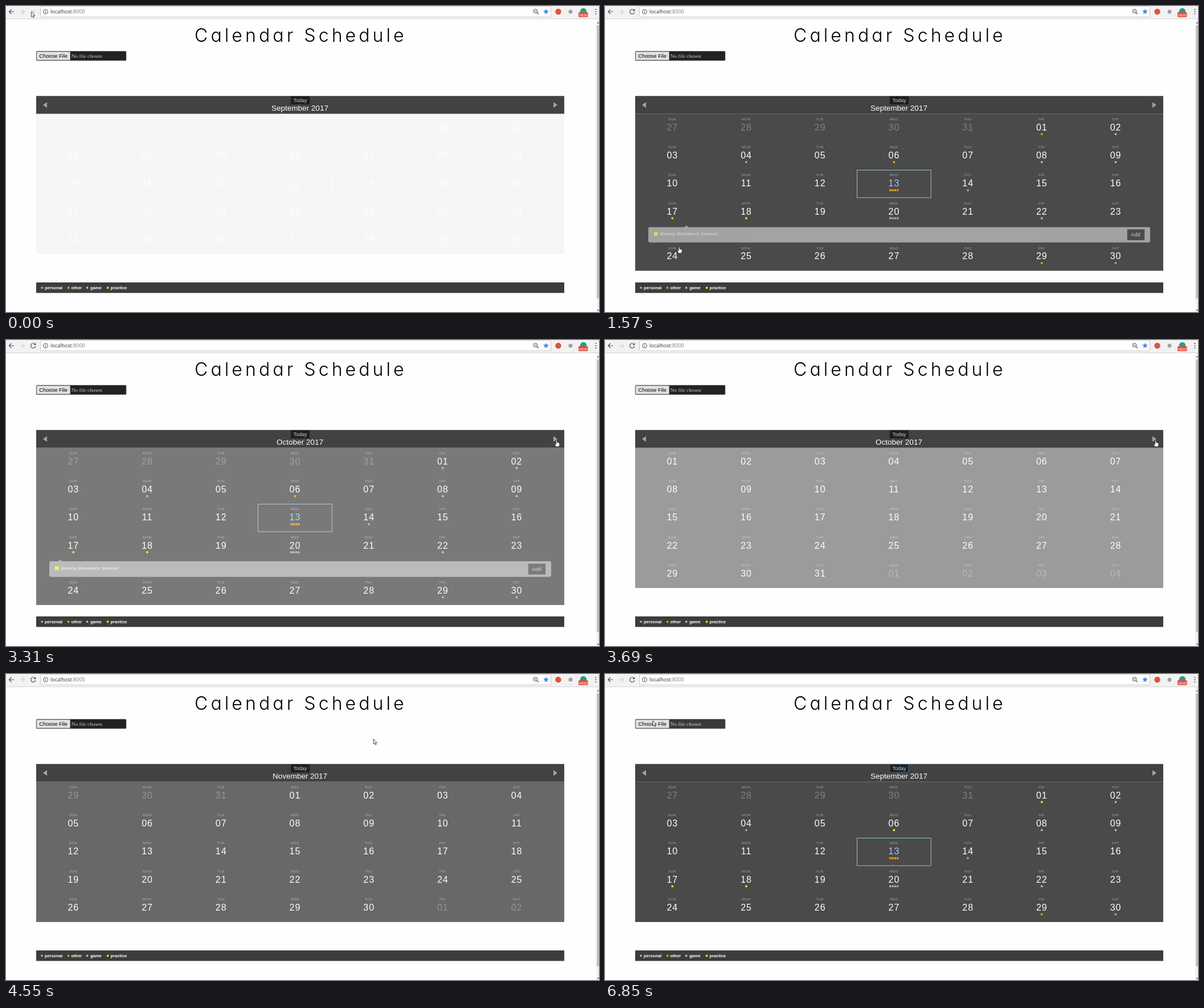
Recreate the animation shown at these times as an HTML page. Size 1041 by 538 pixels, loop 6.93 s.

```html
<!DOCTYPE html>
<html lang="en">
<head>
<meta charset="utf-8">
<title>Calendar Schedule</title>
<style>
  html, body { margin: 0; width: 100%; height: 100%; overflow: hidden; background: #fefefe; }
  svg { display: block; width: 1041px; height: 538px; font-family: "Liberation Sans", Arial, sans-serif; }
  .title { font: 300 32px Inter, sans-serif; letter-spacing: 5.1px; font-feature-settings: "cv11"; }
  .url { font: 9px "Open Sans", sans-serif; }
  .serif { font: 9.25px "Liberation Serif", serif; }
  .name { font-size: 6px; letter-spacing: .5px; fill: #fff; fill-opacity: .5; text-anchor: middle; }
  .num { font-size: 16px; letter-spacing: 1px; fill: #fff; text-anchor: middle; }
  .other { fill-opacity: .3; }
  .today { fill: #9ccaeb; }
  .legend { font-size: 7.5px; font-weight: bold; fill: #fff; }
  .event { font-size: 7.5px; letter-spacing: .5px; fill: #fff; }
</style>
</head>
<body>
<svg id="stage" viewBox="0 0 1041 538"></svg>
<script>
const LOOP = 6930;
const LEFT = 53, TOP = 189.4, WIDTH = 927, COL = 129.7, ROW = 49.33;
const PANEL = { row: 4, margin: 2.4, height: 27.5, start: 1150, length: 500 };
const COLORS = { o: '#ffa500', b: '#9ccaeb', g: '#99c66d', y: '#fff01a' };
const DAYS = ['SUN', 'MON', 'TUE', 'WED', 'THU', 'FRI', 'SAT'];
const EVENTS = { 1: 'y', 2: 'b', 4: 'g', 6: 'y', 8: 'b', 9: 'b', 13: 'oooo', 14: 'g',
  17: 'y', 18: 'y', 20: 'bggg', 22: 'b', 29: 'o', 30: 'g' };

const SEPTEMBER = { lead: 5, length: 30, today: 13 };
const VIEWS = [
  { ...SEPTEMBER, events: { ...EVENTS, 1: 'o', 6: 'o' }, panel: true, fadeIn: [-20, 1000], fadeOut: [3130, 400] },
  { lead: 0, length: 31, events: {}, fadeIn: [3540, 400], fadeOut: [4050, 240] },
  { lead: 3, length: 30, events: {}, fadeIn: [4290, 400], fadeOut: [5550, 190] },
  { ...SEPTEMBER, events: EVENTS, fadeIn: [5740, 400], fadeOut: [9000, 1] },
];
const TITLES = [[0, 'September 2017'], [3130, 'October 2017'], [4050, 'November 2017'], [5400, 'September 2017']];

// time, x, y of the hotspot, hand (1) or arrow (0)
const POINTER = [
  [0, 44.5, 10, 0], [80, 44.5, 10, 0], [760, 97, 80, 0], [880, 104, 215, 1], [1010, 112, 355, 1],
  [1180, 116, 362, 1], [1480, 130, 423, 1], [1990, 130, 423, 1], [2130, 143, 411, 0],
  [2260, 160, 399, 0], [2420, 250, 393, 0], [2700, 700, 250, 1], [2930, 966.5, 176, 1],
  [4200, 966.5, 176, 1], [4370, 830, 140, 0], [4520, 645, 114, 0], [4620, 645, 114, 0],
  [4770, 522, 153, 0], [4880, 516, 164, 1], [5180, 512, 173, 1], [6170, 512, 173, 1],
  [6320, 430, 208, 1], [6480, 310, 180, 0], [6840, 84, 82, 0], [LOOP, 84, 82, 0],
];

const clamp = v => Math.min(1, Math.max(0, v));

function bezier(x1, y1, x2, y2) {
  const at = (a, b, s) => 3 * a * s * (1 - s) ** 2 + 3 * b * s * s * (1 - s) + s ** 3;
  return x => {
    x = clamp(x);
    let low = 0, high = 1;
    for (let i = 0; i < 24; i++) {
      const mid = (low + high) / 2;
      if (at(x1, x2, mid) < x) low = mid; else high = mid;
    }
    return at(y1, y2, high);
  };
}
const ease = bezier(.25, .1, .25, 1);
const easeIn = bezier(.42, 0, 1, 1);
const easeOut = bezier(0, 0, .58, 1);

const rect = (x, y, w, h, fill, more = '') =>
  `<rect x="${x}" y="${y}" width="${w}" height="${h}" fill="${fill}" ${more}/>`;
const text = (x, y, label, more = '') => `<text x="${x}" y="${y}" ${more}>${label}</text>`;
const path = (d, more) => `<path d="${d}" ${more}/>`;
const line = (d, color, width = 1.2) => path(d, `fill="none" stroke="${color}" stroke-width="${width}"`);
const circle = (x, y, r, more) => `<circle cx="${x}" cy="${y}" r="${r}" ${more}/>`;

function browserBar() {
  const star = Array.from({ length: 10 }, (_, i) => {
    const r = i % 2 ? 2.2 : 5.3, a = i * Math.PI / 5;
    return `${948 + r * Math.sin(a)},${10 - r * Math.cos(a)}`;
  }).join(' ');
  return rect(0, 0, 1041, 22, '#f2f2f2') + rect(0, 22, 1041, 1, '#d4d4d4') +
    rect(60.5, .5, 896, 18.5, '#fff', 'stroke="#c9c9c9" rx="1"') +
    line('M14 10H5.5M9.5 6L5.5 10L9.5 14', '#505050') +
    line('M24 10H32.5M28.5 6L32.5 10L28.5 14', '#cfcfcf') +
    `<g id="reload">${line('M51 7.3A4.2 4.2 0 1 0 51.8 11', '#505050')}${path('M52.3 5V9H48.3Z', 'fill="#505050"')}</g>` +
    `<g id="stop">${line('M44 6.5L51 13.5M51 6.5L44 13.5', '#d0d0d0')}</g>` +
    circle(69.5, 10, 4, 'fill="none" stroke="#555"') + line('M69.5 9.3V12.4M69.5 7.4V8.5', '#555', 1) +
    text(78, 13, 'localhost<tspan fill="#7b7b7b">:8000</tspan>', 'class="url" fill="#303030"') +
    circle(929.5, 9, 3.2, 'fill="none" stroke="#5a5a5a" stroke-width="1.1"') +
    line('M932 11.5L935 14.5M928 9H931', '#5a5a5a') +
    `<polygon points="${star}" fill="#3c84ee"/>` +
    circle(969.5, 10, 5.2, 'fill="#e0533d"') + circle(991, 10, 3.5, 'fill="#a0a0a0"') +
    circle(1013.5, 9.5, 5.7, 'fill="#17a586"') +
    rect(1005, 11, 16.5, 8.5, '#e34b3e', 'rx="1"') +
    text(1013.2, 17.7, 'NEW', 'font-size="6.2" fill="#fff" text-anchor="middle"') +
    [6, 10, 14].map(y => circle(1035.5, y, 1.1, 'fill="#555"')).join('') +
    rect(1036.5, 23, 4.5, 515, '#f1f1f1') + rect(1037, 34, 4, 480, '#c1c1c1') +
    path('M1037.5 30.5L1039.5 28L1041 30.5ZM1037.5 534L1041 534L1039.5 536.5Z', 'fill="#555"');
}

function pageFrame() {
  const legend = [[61.5, 68, 'personal', 'g'], [108, 114.5, 'other', 'o'], [141, 148, 'game', 'b'], [177, 183.5, 'practice', 'y']];
  return text(331, 63, 'Calendar Schedule', 'class="title"') +
    rect(53.3, 79.8, 157.5, 16, '#222', 'id="fileBox" rx="1" stroke="#303030" stroke-width=".8"') +
    rect(53.9, 80.5, 58.7, 14.5, '#e2e2e2', 'stroke="#999" stroke-width=".8"') +
    text(58.3, 90.7, 'Choose File', 'font-size="9.3"') +
    text(114.8, 90.5, 'No file chosen', 'class="serif" fill="#ccc"') +
    rect(LEFT, 486, WIDTH, 18.5, '#3c3c3c') +
    legend.map(([x, tx, label, color]) =>
      rect(x, 493.7, 3.2, 3.4, COLORS[color]) + text(tx, 498, label, 'class="legend"')).join('');
}

function calendarHeader() {
  return rect(LEFT, 158.2, WIDTH, 31.3, '#424242') +
    path('M72 169V179L65 174ZM961 169V179L968 174Z', 'fill="#a4a4a4"') +
    rect(499.8, 158.8, 33.2, 14.2, '#1f1f1f', 'id="todayButton" stroke-width="1"') +
    text(516.4, 169, 'Today', 'font-size="9" fill="#ccc" text-anchor="middle"') +
    text(516, 184.2, '', 'id="month" font-size="13.5" fill="#fff" text-anchor="middle"');
}

function dayCell(view, index) {
  const n = index - view.lead;
  const inside = n >= 0 && n < view.length;
  const day = inside ? n + 1 : n < 0 ? 32 + n : n - view.length + 1;
  const isToday = inside && day === view.today;
  const left = LEFT + COL * (index % 7), top = TOP + ROW * Math.floor(index / 7);
  const x = left + COL / 2;
  const kind = isToday ? ' today' : inside ? '' : ' other';
  const dots = inside && view.events[day] || '';
  return (isToday ? rect(left + .4, top + .4, COL, ROW - .8, 'none', 'stroke="#9ccaeb" stroke-width=".9"') : '') +
    text(x + .2, top + 11.4, DAYS[index % 7], 'class="name"') +
    text(x + .5, top + 29.3, String(day).padStart(2, '0'), `class="num${kind}"`) +
    [...dots].map((c, i) =>
      rect(x + .4 + 4.25 * (i - dots.length / 2) + .5, top + 34.2, 3.2, 3.2, COLORS[c])).join('');
}

function eventPanel() {
  return `<g id="panel">` +
    path('M-3.5 .3L0 -3L3.5 .3Z', 'id="notch" fill="#a4a4a4"') +
    rect(76, 0, 881, PANEL.height, '#a4a4a4', 'id="panelBody" rx="3"') +
    `<g id="panelEvent">${rect(85.7, 9, 6.8, 6.3, '#fff01a')}` +
    text(96.2, 14.6, 'Weekly Woodwork Session', 'class="event"') + '</g><g id="addButton">' +
    rect(917, 4.2, 30, 18.8, '#4c4c4c', 'stroke="#5c5c5c" stroke-width=".6"') +
    text(931.5, 16.6, 'Add', 'font-size="9.4" fill="#ccc" text-anchor="middle"') + '</g></g>';
}

function monthView(view, id) {
  let rows = '';
  for (let r = 0; r < 5; r++) {
    const cells = DAYS.map((_, c) => dayCell(view, r * 7 + c)).join('');
    rows += `<g ${view.panel && r === PANEL.row ? 'id="lastRow"' : ''}>${cells}</g>`;
  }
  return `<g id="view${id}">` + rect(LEFT, TOP, WIDTH, ROW * 5, '#4a4a4a', view.panel ? 'id="sheet"' : '') +
    rows + (view.panel ? eventPanel() : '') + '</g>';
}

function pointers() {
  const look = 'fill="#fff" stroke="#222" stroke-width=".8" stroke-linejoin="round"';
  return path('M0 0V9.2L2.1 7.3L3.6 10.5L5 9.9L3.5 6.8H6.2Z', `id="arrow" ${look}`) +
    path('M-1 1Q0 -.7 1 1V4.4Q2 3.6 2.8 4.7Q4 4 4.4 5.2Q5.3 5 5.3 6.2V8.6L4.3 11.7H-.9L-3 8.2Q-3.7 6.6 -2.2 6.8L-1 7.8Z',
      `id="hand" ${look}`);
}

const stage = document.getElementById('stage');
stage.innerHTML = pageFrame() + VIEWS.map(monthView).join('') + calendarHeader() + browserBar() + pointers();
const part = id => document.getElementById(id);
const set = (id, attrs) => Object.entries(attrs).forEach(([key, value]) => part(id).setAttribute(key, value));
const show = (id, visible) => set(id, { visibility: visible ? 'visible' : 'hidden' });
const move = (id, x, y) => set(id, { transform: `translate(${x} ${y})` });

function drawViews(t) {
  VIEWS.forEach(({ fadeIn, fadeOut }, i) => {
    const opacity = easeOut((t - fadeIn[0]) / fadeIn[1]) * (1 - easeIn((t - fadeOut[0]) / fadeOut[1]));
    set('view' + i, { opacity: opacity.toFixed(4) });
  });
  part('month').textContent = TITLES.filter(([start]) => start <= t).pop()[1];
}

function drawPanel(t) {
  const since = t - PANEL.start;
  const p = ease(since / PANEL.length);
  const height = PANEL.height * p;
  const shift = PANEL.margin * p + height;
  show('panel', since > 0);
  set('panel', { opacity: .3 + .7 * p });
  move('panel', 0, TOP + ROW * PANEL.row + PANEL.margin * p - (1 - p) * height);
  set('panelBody', { height });
  set('panelEvent', { opacity: ease((since - 300) / 300) });
  set('addButton', { opacity: p });
  move('notch', 516 - 421 * ease(since / 700), 0);
  move('lastRow', 0, shift);
  set('sheet', { height: ROW * 5 + shift });
}

function drawPointer(t) {
  const next = Math.max(1, POINTER.findIndex(([time]) => time > t));
  const [t0, x0, y0, hand] = POINTER[next - 1];
  const [t1, x1, y1] = POINTER[next];
  const k = (t - t0) / (t1 - t0);
  show('hand', hand);
  show('arrow', !hand);
  move(hand ? 'hand' : 'arrow', x0 + (x1 - x0) * k, y0 + (y1 - y0) * k);
}

function draw(t) {
  drawViews(t);
  drawPanel(t);
  drawPointer(t);
  show('stop', t < 80);
  show('reload', t >= 80);
  set('todayButton', {
    fill: t > 4880 && t < 6220 ? '#343434' : '#1f1f1f',
    stroke: t >= 5350 ? '#3f6a9c' : 'none',
  });
  set('fileBox', { fill: t > 6760 ? '#3a3a3a' : '#222' });
}

const begin = performance.now();
function tick() {
  draw((performance.now() - begin) % LOOP);
  requestAnimationFrame(tick);
}
tick();
</script>
</body>
</html>
```
